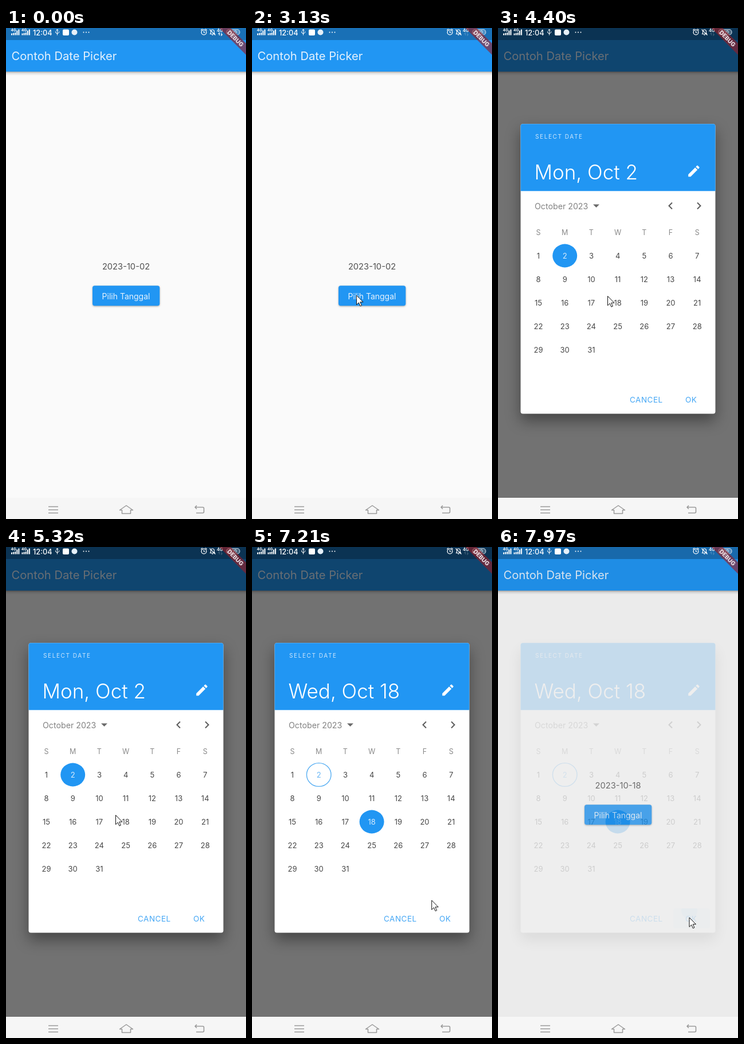
Write an HTML page with a canvas that moves like this. It is 419 by 856 pixels and loops after 8000 ms.

```html
<!DOCTYPE html>
<html lang="id">
<head>
<meta charset="utf-8">
<title>Contoh Date Picker</title>
<style>
html, body { margin: 0; width: 100%; height: 100%; overflow: hidden; background: #fafafa; }
canvas { display: block; width: 419px; height: 856px; }
</style>
</head>
<body>
<canvas id="stage"></canvas>
<script>
const W = 419, H = 856, LOOP = 8000;
const BLUE = '#2196f3', WHITE = '#fff', INK = '#464646', GREY = '#8a8a8a', NAV = '#9a9a9a';
const OPEN = 4400, PICK = 5780, PRESS = 7760, CLOSE = 7970;
const scale = window.devicePixelRatio || 1;

function surface(canvas) {
  canvas.width = Math.round(W * scale);
  canvas.height = Math.round(H * scale);
  const c = canvas.getContext('2d');
  c.scale(scale, scale);
  return c;
}
const stage = surface(document.getElementById('stage'));
const sheet = document.createElement('canvas');
const dialog = surface(sheet);

// y is the middle of the capital letters
function text(c, str, x, y, size, color, { weight = 400, align = 'left', gap = 0 } = {}) {
  c.font = `${weight} ${size}px Inter, Roboto, sans-serif`;
  c.letterSpacing = gap + 'px';
  c.textAlign = align;
  c.fillStyle = color;
  c.fillText(str, x, y + size * 0.364);
}

function box(c, x, y, w, h, color, r = 0) {
  c.fillStyle = color;
  c.beginPath();
  c.roundRect(x, y, w, h, r);
  c.fill();
}

function oval(c, x, y, rx, ry, color, line) {
  c.beginPath();
  c.ellipse(x, y, rx, ry, 0, 0, Math.PI * 2);
  if (line) {
    c.strokeStyle = color;
    c.lineWidth = line;
    c.stroke();
  } else {
    c.fillStyle = color;
    c.fill();
  }
}

function stroke(c, d, color, width) {
  c.strokeStyle = color;
  c.lineWidth = width;
  c.stroke(new Path2D(d));
}

function shadow(c, color, blur, dy) {
  c.shadowColor = color;
  c.shadowBlur = blur * scale;
  c.shadowOffsetY = dy * scale;
}

function drawApp(c, date) {
  box(c, 0, 0, W, H, '#fafafa');
  const fade = c.createLinearGradient(0, 76, 0, 83);
  fade.addColorStop(0, 'rgba(0,0,0,.32)');
  fade.addColorStop(0.4, 'rgba(0,0,0,.1)');
  fade.addColorStop(1, 'rgba(0,0,0,0)');
  box(c, 0, 76, W, 7, fade);
  box(c, 0, 0, W, 76, BLUE);
  box(c, 0, 0, W, 21, '#1970b6');
  text(c, 'Contoh Date Picker', 9.5, 49, 20.2, '#e4f1fd');
  text(c, date, 209.5, 415.5, 14.7, '#505050', { align: 'center' });
  c.save();
  shadow(c, 'rgba(0,0,0,.35)', 3, 1);
  box(c, 151, 449.3, 117.3, 35, BLUE, 4);
  c.restore();
  text(c, 'Pilih Tanggal', 209.5, 468, 14, '#e6f2fd', { align: 'center' });
}

const pencil = new Path2D('M3 17.25V21h3.75L17.81 9.94l-3.75-3.75zM20.71 7.04c.39-.39.39-1.02 0-1.41l-2.34-2.34c-.39-.39-1.02-.39-1.41 0l-1.83 1.83 3.75 3.75z');

function drawDialog(c, t) {
  const day = t < PICK ? 2 : 18;
  c.clearRect(0, 0, W, H);
  c.save();
  shadow(c, 'rgba(0,0,0,.4)', 26, 12);
  box(c, 39.5, 167.3, 340, 505.2, WHITE, 4);
  c.restore();
  box(c, 39.5, 167.3, 340, 117, BLUE, [4, 4, 0, 0]);
  text(c, 'SELECT DATE', 65, 189.5, 10, '#d0e7fc', { gap: 1.6 });
  text(c, day === 2 ? 'Mon, Oct 2' : 'Wed, Oct 18', 63.5, 251, 35, WHITE, { weight: 350 });
  c.save();
  c.translate(329, 236.5);
  c.scale(1.08, 1.08);
  c.fillStyle = WHITE;
  c.fill(pencil);
  c.restore();

  text(c, 'October 2023', 64, 311, 14.2, '#828282');
  c.fillStyle = '#6a6a6a';
  c.fill(new Path2D('M166 307.5h11l-5.5 5.5z'));
  stroke(c, 'M304 304.5l-5.5 5.5 5.5 5.5M348 304.5l5.5 5.5-5.5 5.5', '#5c5c5c', 2);

  const colX = i => 70.5 + 46.2 * i;
  [...'SMTWTFS'].forEach((s, i) => text(c, s, colX(i), 356.5, 12.5, GREY, { align: 'center' }));
  for (let n = 1; n <= 31; n++) {
    const x = colX((n - 1) % 7), y = 397 + 41 * Math.floor((n - 1) / 7);
    let color = INK;
    if (n === day) {
      oval(c, x, y, 21.5, 20.4, BLUE);
      color = '#d8ecfd';
    } else if (n === 2) {
      oval(c, x, y, 21.3, 20.4, '#58aff3', 1.4);
      color = '#68b6f4';
    }
    text(c, n, x, y + 0.5, 13, color, { align: 'center' });
  }

  const press = Math.max(0, Math.min(1, (t - PRESS) / 140));
  if (press) {
    c.save();
    c.beginPath();
    c.roundRect(306, 630, 64, 35, 4);
    c.clip();
    box(c, 306, 630, 64, 35, `rgba(33,150,243,${0.07 * press})`);
    oval(c, 334, 634, 4 + 10 * press, 4 + 10 * press, 'rgba(33,150,243,.13)');
    c.restore();
  }
  text(c, 'CANCEL', 230, 648.5, 13.5, '#45a7f5', { gap: 0.5 });
  text(c, 'OK', 327, 648.5, 13.5, '#45a7f5', { gap: 0.5 });
}

function drawSignal(c, x) {
  text(c, '4G', x, 3.5, 6.5, WHITE, { weight: 700 });
  for (let i = 0; i < 5; i++) {
    const h = i < 3 ? 3 + i * 0.8 : 2 + i * 2;
    box(c, x + 0.5 + i * 3.1, 12.5 - h, 2, h, WHITE);
  }
}

function drawStatus(c, t) {
  drawSignal(c, 8.5);
  drawSignal(c, 27);
  text(c, '12:04', 47, 8, 12.8, WHITE, { weight: 500 });
  stroke(c, 'M89.5 2.5v10M87.5 4.5l2-2.5 2 2.5M86.5 6v2l3 2.2 3-2.2V6', WHITE, 1);
  box(c, 99, 2.5, 11, 10.5, WHITE, 2);
  oval(c, 119.5, 7.5, 5, 5, '#e6f0f8');
  for (let i = 0; i < 3; i++) oval(c, 135.5 + i * 4.5, 7.5, 1, 1, WHITE);

  oval(c, 345.5, 7.5, 4.4, 4.4, WHITE, 1.3);
  stroke(c, 'M345.5 5v3h2.3M340.3 4l2.6-2.4M350.7 4l-2.6-2.4', WHITE, 1.2);
  stroke(c, 'M356.5 10.5h8l-1-2V6a3 3 0 0 0-6 0v2.5zM359.3 12.3h2.4M355.5 2.5l10 10', WHITE, 1.1);
  text(c, '4G', 368, 4.5, 7.5, WHITE, { weight: 600 });
  // data arrows flicker with traffic
  const both = t < 710 || (t >= PICK && t < 6520);
  c.globalAlpha = both ? 0.95 : 0.2;
  stroke(c, 'M372.5 13V8.5l-1.8 2M376 8.5V13l1.8-2', WHITE, 1.2);
  c.globalAlpha = 1;
  box(c, 385, 2.5, 23, 9.5, 'rgba(255,255,255,.25)', 4.5);
  c.strokeStyle = '#c5d6e4';
  c.lineWidth = 1.2;
  c.stroke();
  text(c, '100', 396.5, 7.3, 7.5, '#d5e2ec', { align: 'center', weight: 600 });
}

function drawBanner(c) {
  c.save();
  c.translate(W, 0);
  c.rotate(Math.PI / 4);
  box(c, -60, 19, 120, 14, 'rgba(150,28,36,.62)');
  text(c, 'DEBUG', 0, 26, 10.2, '#ecdfe4', { weight: 800, align: 'center' });
  c.restore();
}

function drawNav(c) {
  box(c, 0, 819, W, 37, '#f6f6f6');
  c.lineJoin = 'round';
  stroke(c, 'M74 834.5h17M74 840h17M74 845.5h17', NAV, 1.6);
  stroke(c, 'M202.5 840.5h-4l11.5-8 11.5 8h-4v6h-15z', NAV, 1.5);
  stroke(c, 'M333 832.5l-3 3 3 3M330 835.5h13.5a2 2 0 0 1 2 2v6a2 2 0 0 1-2 2H332', NAV, 1.6);
  c.lineJoin = 'miter';
}

// start, end, steps, x, y, ease-out power
const moves = [
  [640, 850, 4, 178, 429, 1],
  [1180, 1390, 4, 178, 465, 3.5],
  [3130, 3340, 4, 191, 467, 1.3],
  [5780, 6330, 9, 160.5, 440, 1.4],
  [6520, 7280, 11, 325, 629, 1.1],
  [7350, 7420, 2, 333.5, 645.5, 1]
];

function pointer(t) {
  let x = 205, y = 886;
  for (const [start, end, steps, toX, toY, power] of moves) {
    if (t < start) break;
    const step = Math.floor((t - start) / (end - start) * (steps - 1) + 1e-6) + 1;
    const p = 1 - Math.pow(1 - Math.min(1, step / steps), power);
    x += (toX - x) * p;
    y += (toY - y) * p;
  }
  return [x, y];
}

const arrow = new Path2D('M.5.5v16.3l3.8-3.6 2.6 6 2.5-1.1-2.6-5.9h5.2z');

function drawPointer(c, t) {
  if (t < 640) return;
  const [x, y] = pointer(t);
  if (t >= 5060 && t < 5320) oval(c, x, y + 1, 15, 15, 'rgba(33,150,243,.13)');
  c.save();
  c.translate(x, y);
  c.fillStyle = WHITE;
  c.fill(arrow);
  c.strokeStyle = '#111';
  c.lineWidth = 1;
  c.stroke(arrow);
  c.restore();
}

function draw(t) {
  const c = stage;
  const closing = t >= CLOSE;
  drawApp(c, closing ? '2023-10-18' : '2023-10-02');
  if (t >= OPEN) {
    box(c, 0, 0, W, H, `rgba(0,0,0,${closing ? 0.06 : 0.54})`);
    drawDialog(dialog, t);
    c.globalAlpha = closing ? 0.18 : 1;
    c.drawImage(sheet, 0, 0, W, H);
    c.globalAlpha = 1;
  }
  drawStatus(c, t);
  drawBanner(c);
  drawNav(c);
  drawPointer(c, t);
}

const begin = performance.now();
function tick() {
  draw((performance.now() - begin) % LOOP);
  requestAnimationFrame(tick);
}
tick();
</script>
</body>
</html>
```
